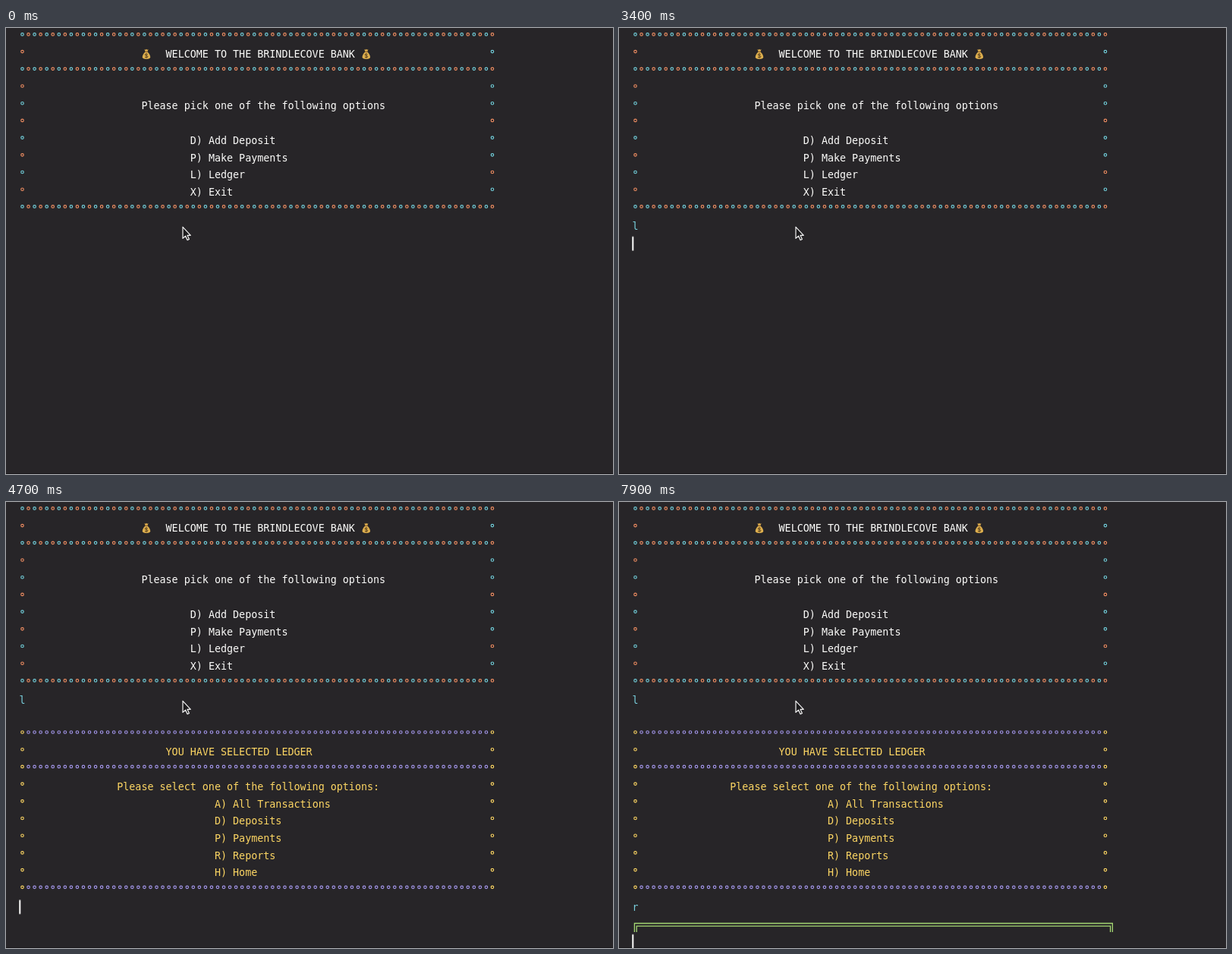
Animation of 800x588 px, one loop 8000 ms. Source, as an HTML page:

```html
<!DOCTYPE html>
<html lang="en">
<head>
<meta charset="utf-8">
<title>Bank console</title>
<style>
  html, body { margin: 0; width: 100%; height: 100%; overflow: hidden; background: #272528; }
  svg { display: block; }
  text { font: 13.36px "DejaVu Sans Mono", monospace; white-space: pre; }
  .typed { font-style: italic; fill: #78cfdc; }

  #cursor, .step { animation: 8s step-end -20ms infinite; }
  #cursor { animation-name: cursor; }
  #pick { animation-name: pick; }
  #ledger { animation-name: ledger; }
  #report { animation-name: report; }
  #table { animation-name: table; }

  @keyframes pick { 0% { opacity: 0 } 31.25%, 100% { opacity: 1 } }
  @keyframes ledger { 0% { opacity: 0 } 45%, 100% { opacity: 1 } }
  @keyframes report { 0% { opacity: 0 } 80%, 100% { opacity: 1 } }
  @keyframes table { 0% { opacity: 0 } 96.25%, 100% { opacity: 1 } }

  /* blinks every 500 ms; restarts on each key and new line */
  @keyframes cursor {
    0%, 15%, 27.5% { opacity: 0; transform: none }
    8.75%, 21.25% { opacity: 1; transform: none }
    31.25% { opacity: 1; transform: translate(8.045px, 0) }
    40% { opacity: 0; transform: translate(8.045px, 0) }
    42.5% { opacity: 1; transform: translate(0, 22.7px) }
    45%, 58.75%, 71.25% { opacity: 1; transform: translate(0, 272.4px) }
    52.5%, 65%, 77.5% { opacity: 0; transform: translate(0, 272.4px) }
    80% { opacity: 1; transform: translate(8.045px, 272.4px) }
    88.75% { opacity: 0; transform: translate(8.045px, 272.4px) }
    93.75% { opacity: 1; transform: translate(0, 295.1px) }
    96.25%, 100% { opacity: 1; transform: translate(0, 317.8px) }
  }
</style>
</head>
<body>
<svg width="800" height="588" viewBox="0 0 800 588">
  <defs>
    <g id="bag">
      <path d="M-2.6-6.5L-1.2-5.7 0-6.6 1.2-5.7 2.6-6.5 1.5-3.4H-1.5Z" fill="#d8a94c"/>
      <path d="M-1.6-2.6C-3.5-1.2-5.2 1.6-5.2 3.8-5.2 5.8-3.4 6.5 0 6.5S5.2 5.8 5.2 3.8C5.2 1.6 3.5-1.2 1.6-2.6Z" fill="#dfb04e"/>
      <path d="M-2-3H2" stroke="#8a5f2a" stroke-width="1"/>
      <path d="M1.8 .6C1.2-.5-1.8-.6-1.8 .9-1.8 2.4 1.9 1.6 1.9 3.4 1.9 4.9-1.3 4.9-2 3.6M0-1V5.4" fill="none" stroke="#5d4420" stroke-width="1"/>
    </g>
  </defs>
  <rect width="800" height="588" fill="#272528"/>
  <rect y="587" width="800" height="1" fill="#18171a"/>
  <g id="menu" fill="#fcfcfa">
    <use href="#bag" x="185" y="34.4"/>
    <use href="#bag" x="474.8" y="34.4"/>
  </g>
  <g id="pick" class="step typed"></g>
  <g id="ledger" class="step" fill="#fdd663"></g>
  <g id="report" class="step typed"></g>
  <g id="table" class="step" fill="none" stroke="#a5d873" stroke-width="1.3">
    <path d="M20.4 567V555.5H650.4V567"/>
    <path d="M23.2 567V559.2H647.6V567"/>
  </g>
  <rect id="cursor" x="17.3" y="252.3" width="2" height="18.5" fill="#fcfcfa"/>
  <path d="M233 262.3V277.4L236.6 274.2 239 279.6 241.4 278.5 239 273.3H243.3Z" fill="#1c1b1d" stroke="#f4f4f4" stroke-width="1.2" stroke-linejoin="round"/>
</svg>
<script>
  const CELL = 8.045, LINE = 22.7, LEFT = 17.5, LAST = 77;
  const CYAN = '#72d0dc', ORANGE = '#f08e62', PURPLE = '#a396ea', YELLOW = '#fdd663';

  function add(group, tag, attrs, label = '') {
    const node = document.createElementNS('http://www.w3.org/2000/svg', tag);
    for (const key in attrs) node.setAttribute(key, attrs[key]);
    node.textContent = label;
    document.getElementById(group).append(node);
  }

  const write = (group, row, col, label) =>
    add(group, 'text', { x: LEFT + col * CELL, y: 16.6 + row * LINE }, label);

  const ring = (group, row, col, color) =>
    add(group, 'circle', {
      cx: LEFT + (col + 0.5) * CELL, cy: 8.4 + row * LINE, r: 1.75,
      fill: 'none', stroke: color, 'stroke-width': 1.15
    });

  function rule(group, row, colorAt) {
    for (let col = 0; col <= LAST; col++) ring(group, row, col, colorAt(col));
  }

  // main menu
  const striped = col => col % 2 ? ORANGE : CYAN;
  const rightSide = 'ococcoccoco';
  for (let row = 0; row <= 10; row++) {
    if ([0, 2, 10].includes(row)) {
      rule('menu', row, striped);
    } else {
      ring('menu', row, 0, striped(row));
      ring('menu', row, LAST, rightSide[row] === 'c' ? CYAN : ORANGE);
    }
  }
  write('menu', 1, 24, 'WELCOME TO THE BRINDLECOVE BANK');
  write('menu', 4, 20, 'Please pick one of the following options');
  ['D) Add Deposit', 'P) Make Payments', 'L) Ledger', 'X) Exit']
    .forEach((label, i) => write('menu', 6 + i, 28, label));

  // ledger menu
  const capped = col => col % LAST ? PURPLE : YELLOW;
  for (let row = 13; row <= 22; row++) {
    if ([13, 15, 22].includes(row)) {
      rule('ledger', row, capped);
    } else {
      ring('ledger', row, 0, YELLOW);
      ring('ledger', row, LAST, YELLOW);
    }
  }
  write('ledger', 14, 24, 'YOU HAVE SELECTED LEDGER');
  write('ledger', 16, 16, 'Please select one of the following options:');
  ['A) All Transactions', 'D) Deposits', 'P) Payments', 'R) Reports', 'H) Home']
    .forEach((label, i) => write('ledger', 17 + i, 32, label));

  // typed answers
  write('pick', 11, 0, 'l');
  write('report', 23, 0, 'r');
</script>
</body>
</html>
```
